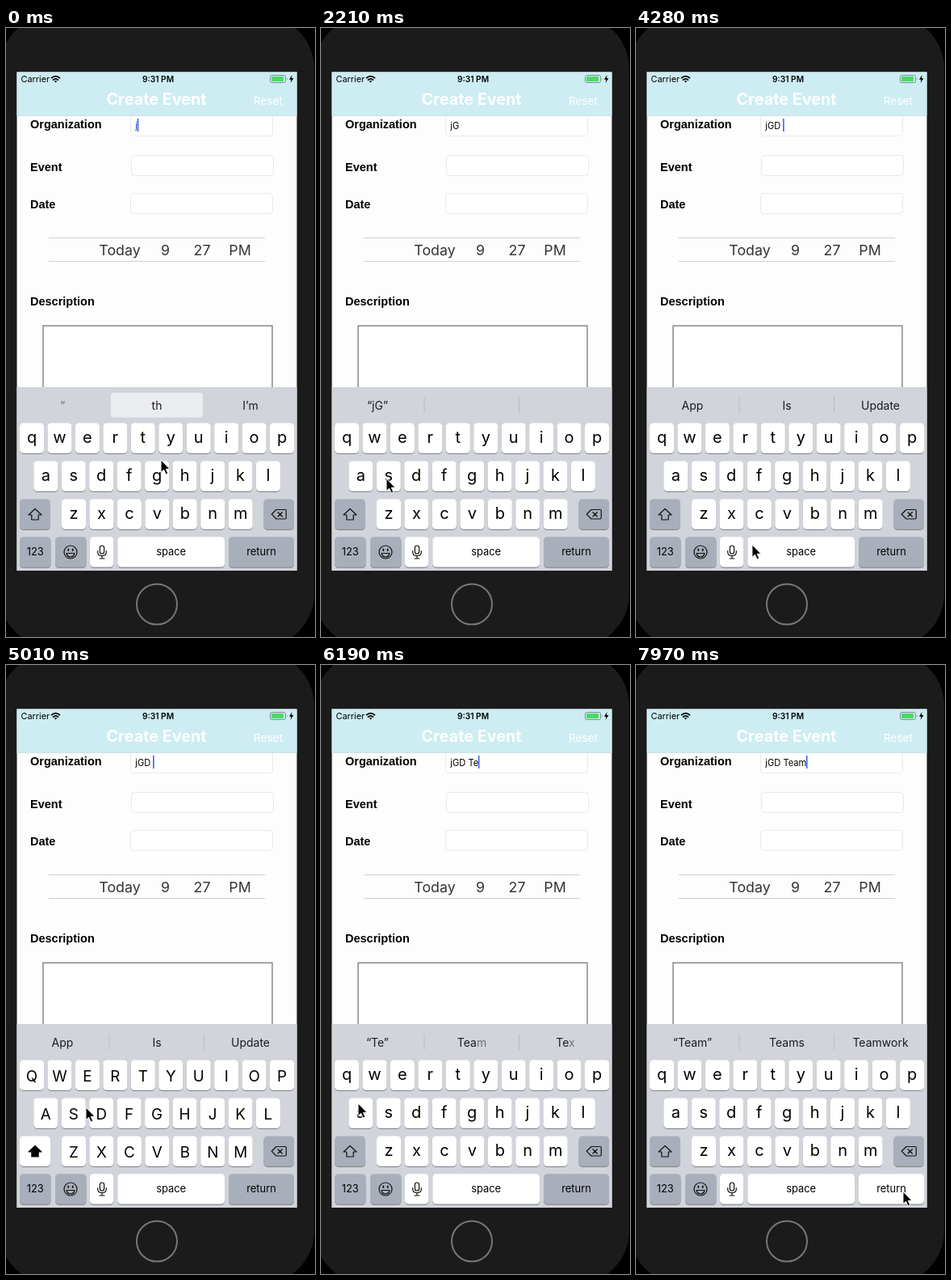
An HTML page for the animation above (8 s loop, 383x753 px).

```html
<!DOCTYPE html>
<html lang="en">
<head>
<meta charset="utf-8">
<title>Create Event</title>
<style>
html, body { margin: 0; width: 100%; height: 100%; overflow: hidden; background: #000; }
svg { display: block; width: 383px; height: 753px; font-family: Inter, sans-serif; }
text { white-space: pre; }
.mid { text-anchor: middle; }
.label { font: bold 14.5px "Liberation Sans", Arial, sans-serif; }
.field { fill: #fff; stroke: #e9e9e9; }
.picker { font-size: 17.8px; fill: #333; }
.cap { font-size: 12.9px; }
.hint { font-size: 14px; fill: #1c1d1f; }
.icon { fill: none; stroke: #111; stroke-width: 1.2; stroke-linejoin: round; stroke-linecap: round; }
</style>
</head>
<body>
<svg viewBox="0 0 383 753">
  <rect width="383" height="753"/>
  <rect x="-8" y="-15" width="390" height="780" rx="65" fill="#1b1b1b"/>
  <circle cx="187" cy="712.5" r="25" fill="none" stroke="#777" stroke-width="2"/>
  <rect x="13.5" y="54.5" width="347" height="616.5" fill="#fdfdfd"/>

  <rect class="field" x="154.5" y="104.5" width="176" height="29" rx="4"/>
  <rect class="field" x="155.5" y="157.5" width="176" height="25" rx="4"/>
  <rect class="field" x="154.5" y="204.5" width="176" height="25" rx="4"/>
  <rect id="mark" x="159" y="112" width="5" height="16" fill="#b7cdf8"/>
  <text id="typed" x="160.3" y="124.5" font-size="11.1"></text>
  <rect id="caret" y="112" width="1.6" height="16" fill="#3f62e8"/>

  <rect x="13.5" y="54.5" width="347" height="54" fill="#cdedf2"/>
  <path d="M13.5 108.5H360.5" stroke="#c3dadd" stroke-width=".7"/>
  <text x="18.5" y="67" font-size="10.9">Carrier</text>
  <g fill="none" stroke="#000" stroke-width="1.8">
    <path d="M56 62.2Q61.5 57 67 62.2M58 64.6Q61.5 61.2 65 64.6"/>
    <path d="M59.7 65.7Q61.5 64.3 63.3 65.7L61.5 67.5Z" fill="#000" stroke="none"/>
  </g>
  <text class="mid" x="188.5" y="67" font-size="10.2" font-weight="600">9:31 PM</text>
  <rect x="327.5" y="58.5" width="19" height="9" rx="2" fill="none" stroke="#708589" stroke-width=".9"/>
  <rect x="329" y="60" width="15" height="6" rx=".8" fill="#4cd964"/>
  <path d="M348 61.5Q349.4 63 348 64.5Z" fill="#708589"/>
  <path d="M354.5 58L351 63.7H353.5L352.5 68L356.5 62H354Z"/>
  <g fill="#fff">
    <text class="mid" x="186.5" y="95" font-size="19.8" font-weight="700">Create Event</text>
    <text class="mid" x="325" y="95" font-size="13.5">Reset</text>
  </g>

  <g class="label">
    <text x="30" y="124">Organization</text>
    <text x="30" y="176.7">Event</text>
    <text x="30" y="223">Date</text>
    <text x="30" y="343.4">Description</text>
  </g>
  <path d="M53 259.5H321M53 288.5H321" stroke="#d0d0d0"/>
  <g class="picker mid">
    <text x="141" y="281">Today</text>
    <text x="197.5" y="281">9</text>
    <text x="243" y="281">27</text>
    <text x="290" y="281">PM</text>
  </g>
  <rect x="46" y="368.2" width="284" height="120" fill="#fff" stroke="#777" stroke-width="1.3"/>

  <rect x="13.5" y="444" width="347" height="227" fill="#d1d4da"/>
  <rect id="pick" x="130" y="451" width="114" height="30.5" rx="4" fill="#ebedf0"/>
  <path id="bars" d="M128 456V476M245.5 456V476" stroke="#b9bcc3"/>
  <g id="hints"></g>
  <g id="keys"></g>

  <path id="arrow" class="icon" d="M36 594.5L44 602H40.2V608H31.8V602H28Z"/>
  <path class="icon" d="M335 595.5H346Q347.3 595.5 347.3 597V605.5Q347.3 607 346 607H335L329.2 601.2ZM337 598.7L342.4 604M342.4 598.7L337 604"/>
  <g class="icon">
    <circle cx="80" cy="648" r="8"/>
    <path d="M75 649.5H85Q84 654 80 654T75 649.5Z"/>
    <path d="M77.3 644.5V646M82.7 644.5V646" stroke-width="1.8"/>
    <rect x="116.4" y="640" width="5.2" height="10" rx="2.6"/>
    <path d="M113.7 646.5V648Q113.7 652.6 119 652.6T124.3 648V646.5M119 652.6V656M116 656H122"/>
  </g>
  <path id="pointer" d="M0 0V15.5L3.6 12.3L6.1 18L8.8 16.9L6.3 11.3H11Z" stroke="#fff" stroke-width="1"/>
</svg>
<script>
const LOOP = 8000, BEAT = 147.5;
const LIGHT = '#fff', DARK = '#a9afba';
const $ = id => document.getElementById(id);

function add(parent, tag, attrs, text = '') {
  const el = document.createElementNS('http://www.w3.org/2000/svg', tag);
  for (const name in attrs) el.setAttribute(name, attrs[name]);
  el.textContent = text;
  return parent.appendChild(el);
}

function addKey(x, y, width, fill, label = '') {
  const box = { x, width, height: 37.3, rx: 4.5 };
  add($('keys'), 'rect', { ...box, y: y + 1.1, fill: '#898b90' });
  const face = add($('keys'), 'rect', { ...box, y, fill });
  if (label) add($('keys'), 'text', { class: 'mid cap', x: x + width / 2, y: y + 22.7 }, label);
  return face;
}

const letters = [['qwertyuiop', 17], ['asdfghjkl', 34.3], ['zxcvbnm', 69]].flatMap(([row, left], r) =>
  [...row].map((letter, i) => {
    const x = left + i * 34.45, y = 488.5 + r * 47;
    addKey(x, y, 30, LIGHT);
    return { letter, y, el: add($('keys'), 'text', { class: 'mid', x: x + 15 }) };
  }));
const shift = addKey(17, 582.5, 38, DARK);
addKey(319.5, 582.5, 37.5, DARK);
addKey(17, 629.3, 38.5, DARK, '123');
addKey(61, 629.3, 38.5, DARK);
addKey(104, 629.3, 29.3, LIGHT);
const space = addKey(138.3, 629.3, 132.7, LIGHT, 'space');
const enter = addKey(276, 629.3, 81, DARK, 'return');

const hints = [70, 187, 303].map(x => {
  const el = add($('hints'), 'text', { class: 'mid hint', x, y: 471.5 });
  return [add(el, 'tspan', {}), add(el, 'tspan', { opacity: .55 })];
});

// All schedules below are in beats.
const typing = [[0, 'j'], [9, 'jG'], [23, 'jGD'], [27, 'jGD '], [37, 'jGD T'],
  [41, 'jGD Te'], [43, 'jGD Tea'], [47, 'jGD Team']];
const capsOn = [[4, 9], [17, 23], [33, 37]];
// A bar separates the part of a word that is still fading in.
const suggestions = [[0, '|“', 'th', 'I’m'], [1, '“j”', 'I', 'I’m'], [9, '“jG”', '', ''],
  [23, '“jGD”', '', ''], [28, 'App', 'Is', 'Update'], [37, '“T”', 'The', 'To'],
  [41, '“Te”', 'Tea|m', 'Te|x'], [43, '“Tea”', 'Team', 'Teams'], [47, '“Team”', 'Teams', 'Teamwork']];
const path = [[0, 192, 534], [4, 35, 600], [5, 35, 600], [7, 307, 509], [9, 307, 509],
  [13, 215, 530], [15, 81, 557], [16, 38, 608], [18, 37, 606], [21, 84, 552], [23, 84, 556],
  [24, 97, 582], [26, 165, 645], [28, 165, 645], [32, 30, 606], [33, 36, 612], [34, 99, 547],
  [36, 168, 508], [37, 168, 508], [40, 100, 510], [41, 100, 510], [42, 46, 542], [43, 46, 546],
  [46, 287, 598], [48, 287, 598], [53, 324, 650], [54, 331, 651]];

const latest = (list, beat) => list.filter(item => item[0] <= beat).pop();

function pointerAt(beat) {
  const from = latest(path, beat), to = path[path.indexOf(from) + 1] || from;
  const u = (beat - from[0]) / (to[0] - from[0] || 1), e = u * u * (3 - 2 * u);
  return [1, 2].map(i => from[i] + (to[i] - from[i]) * e);
}

function showKeys(caps) {
  for (const { letter, y, el } of letters) {
    el.textContent = caps ? letter.toUpperCase() : letter;
    el.setAttribute('y', y + (caps ? 26 : 24.3));
    el.setAttribute('font-size', caps ? 18.8 : 20);
  }
  shift.setAttribute('fill', caps ? LIGHT : DARK);
  $('arrow').style.fill = caps ? '#000' : 'none';
}

function draw(beat) {
  const [since, text] = latest(typing, beat);
  const first = text.length === 1;
  $('typed').textContent = text;
  $('typed').setAttribute('fill', first ? '#2448c8' : '#000');
  $('mark').style.opacity = first && beat > 5 ? 1 : 0;
  $('caret').setAttribute('x', 160 + $('typed').getComputedTextLength());
  $('caret').style.opacity = (beat - since) * BEAT % 1000 < 500 ? 1 : 0;

  const [, ...words] = latest(suggestions, beat);
  words.forEach((word, i) => {
    const [solid, fading = ''] = word.split('|');
    hints[i][0].textContent = solid;
    hints[i][1].textContent = fading;
  });
  $('pick').style.opacity = first ? 1 : 0;
  $('bars').style.opacity = first ? 0 : 1;

  showKeys(capsOn.some(([from, to]) => beat >= from && beat < to));
  space.setAttribute('fill', beat === 27 ? DARK : LIGHT);
  enter.setAttribute('fill', beat >= 53 ? LIGHT : DARK);
  $('pointer').setAttribute('transform', `translate(${pointerAt(beat)})`);
}

let shown = -1;
function tick() {
  const beat = Math.floor(performance.now() % LOOP / BEAT + .06);
  if (beat !== shown) draw(shown = beat);
  requestAnimationFrame(tick);
}
tick();
</script>
</body>
</html>
```
